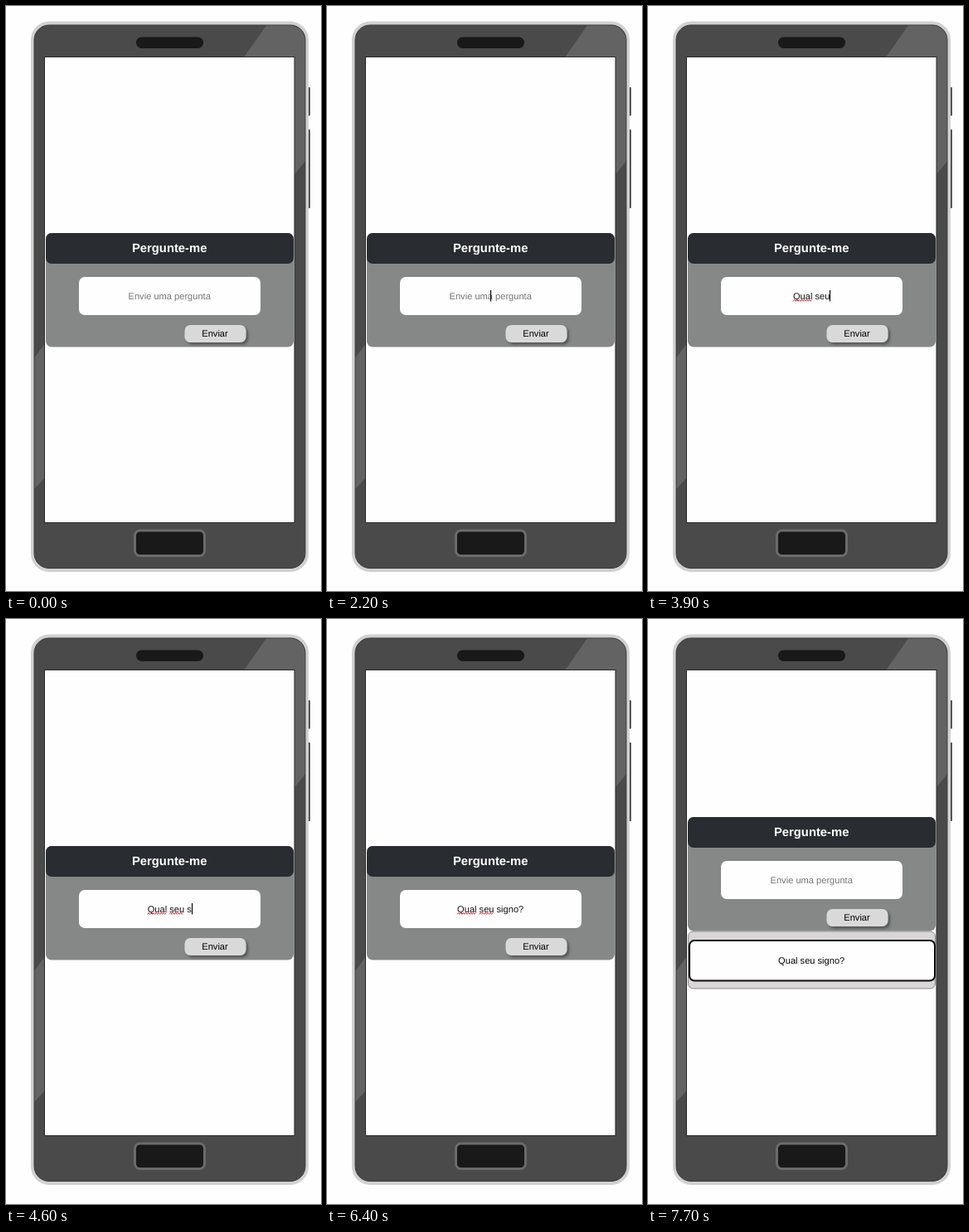
An HTML page for the animation above (8 s loop, 380 by 706 pixels).

```html
<!DOCTYPE html>
<html lang="pt">
<head>
<meta charset="utf-8">
<title>Pergunte-me</title>
<style>
html, body { margin: 0; width: 100%; height: 100%; overflow: hidden; background: #fefefe; }
svg { display: block; width: 380px; height: 706px; }
text { font: 11.1px "Liberation Sans", Arial, sans-serif; text-anchor: middle; white-space: pre; text-rendering: geometricPrecision; }
.title { font-size: 14.8px; font-weight: bold; fill: #fff; }
</style>
</head>
<body>
<svg viewBox="0 0 380 706">
  <defs>
    <filter id="soft" x="-20%" y="-30%" width="150%" height="200%">
      <feDropShadow dx="2.5" dy="2.5" stdDeviation="1.5" flood-color="#333" flood-opacity=".6"/>
    </filter>
    <clipPath id="bezel"><rect x="34" y="23" width="327" height="655.5" rx="18"/></clipPath>
  </defs>

  <!-- phone -->
  <g fill="#555">
    <rect x="363" y="98" width="4" height="34.5" rx="1"/>
    <rect x="363" y="149" width="4" height="95" rx="1"/>
  </g>
  <rect x="30" y="18.5" width="335" height="664.5" rx="22" fill="#d1d1d1"/>
  <g clip-path="url(#bezel)">
    <rect x="34" y="23" width="327" height="656" fill="#4a4a4a"/>
    <path d="M315 22L287 62L348 203L362 186V22ZM33 426L48 406V568L33 584Z" fill="#636363"/>
  </g>
  <rect x="34" y="23" width="327" height="655.5" rx="18" fill="none" stroke="#3d3d3d"/>
  <rect x="157" y="37.5" width="81" height="13.5" rx="6.5" fill="#191919"/>
  <rect x="155.5" y="633" width="84" height="30.5" rx="6" fill="#191919" stroke="#6b6b6b" stroke-width="3"/>
  <rect x="46.5" y="61.5" width="301.5" height="562" fill="#fefefe" stroke="#2c2c2c"/>

  <!-- answer list -->
  <g id="answer">
    <rect x="48.5" y="377" width="298" height="69" rx="6" fill="#d8d6d7" stroke="#8b8b8b"/>
    <rect x="50" y="388" width="296" height="48.5" rx="6" fill="#fefefe" stroke="#0c0c0c" stroke-width="2"/>
    <text x="197.2" y="415.7">Qual seu signo?</text>
  </g>

  <!-- question form -->
  <g id="form">
    <rect x="48" y="274" width="299" height="137.5" rx="7" fill="#858887"/>
    <rect x="48" y="274" width="299" height="37" rx="7" fill="#292c30"/>
    <text class="title" x="197.2" y="297">Pergunte-me</text>
    <rect x="88" y="327" width="219" height="46" rx="7" fill="#fefefe"/>
    <rect x="215.5" y="385" width="74" height="21" rx="7" fill="#d9d9d9" filter="url(#soft)"/>
    <text x="252" y="399">Enviar</text>
    <text id="field" x="197.2" y="353.7"></text>
    <path id="waves" fill="none" stroke="#e0242e" stroke-width="1"/>
    <rect id="caret" y="343" width="1.1" height="13.5" fill="#000"/>
  </g>
</svg>
<script>
const LOOP = 8000, SENT = 7500, BLUR = 7400;
const $ = id => document.getElementById(id);
const field = $("field"), caret = $("caret"), waves = $("waves");

// [start time, text in the field]
const typed = [
  [0, ""], [2400, "Q"], [2600, "Qua"], [2700, "Qual"], [2900, "Qual "], [3200, "Qual s"],
  [3400, "Qual se"], [3500, "Qual seu"], [3700, "Qual seus"], [3900, "Qual seu"],
  [4100, "Qual seu "], [4600, "Qual seu s"], [4700, "Qual seu si"], [4900, "Qual seu sig"],
  [5100, "Qual seu sign"], [5300, "Qual seu signo"], [5800, "Qual seu signo?"], [SENT, ""]
];
// [start time, first letter, end] of words marked by the spell checker
const marks = [[2900, 0, 4], [4100, 5, 8], [6800, 9, 14]];

function wave(from, to) {
  let d = `M${from} 356.3`;
  for (let x = from + 1.5, up = true; x <= to; x += 1.5, up = !up) d += `L${x} ${up ? 354.6 : 356.3}`;
  return d;
}

let last = "";
function draw(t) {
  const text = typed.filter(s => s[0] <= t).pop()[1];
  const sent = t >= SENT;
  const focus = t >= 2200 && t < BLUR;
  const blink = focus && !(t >= 6400 && t < 7000);
  const words = focus ? marks.filter(m => m[0] <= t && m[2] <= text.length) : [];
  const key = [text, sent, blink, words.length].join("|");
  if (key === last) return;
  last = key;

  field.textContent = text || "Envie uma pergunta";
  field.setAttribute("fill", text ? "#111" : "#757575");
  $("form").setAttribute("transform", `translate(0 ${sent ? -35 : 0})`);
  $("answer").style.display = sent ? "" : "none";

  const end = text ? field.getEndPositionOfChar(text.length - 1).x : 197.2;
  caret.setAttribute("x", Math.round(end));
  caret.style.display = blink ? "" : "none";
  waves.setAttribute("d", words.map(([, a, b]) =>
    wave(field.getStartPositionOfChar(a).x, field.getEndPositionOfChar(b - 1).x)).join(""));
}

function tick() {
  draw(performance.now() % LOOP);
  requestAnimationFrame(tick);
}
tick();
</script>
</body>
</html>
```
